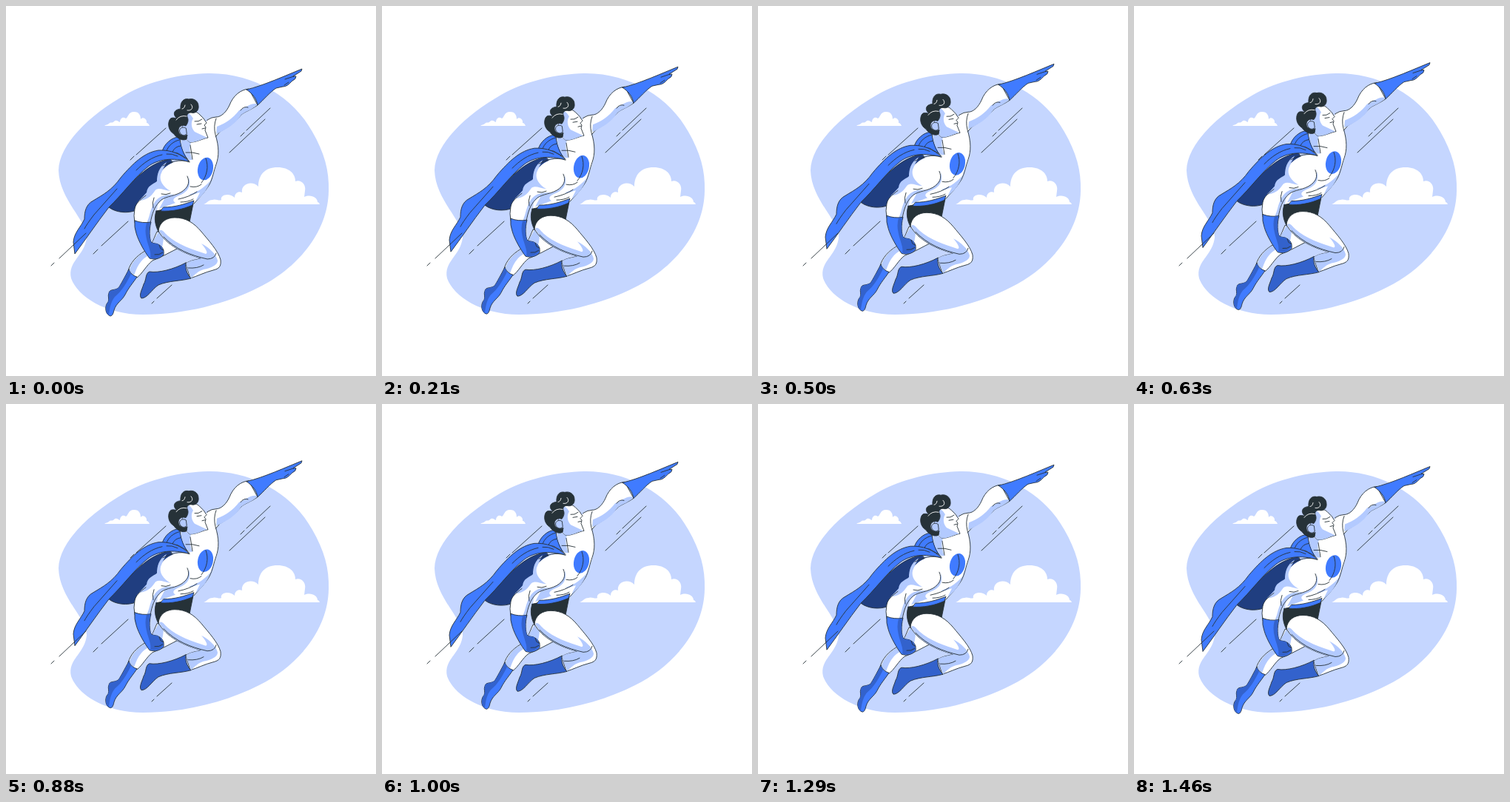
Animation, 500 px wide and 500 px high, one loop 1500 ms. Source, as an HTML page:

```html
<!DOCTYPE html>
<html lang="en">
<head>
<meta charset="utf-8">
<title>Flying hero</title>
<style>
  html, body { margin: 0; width: 100%; height: 100%; overflow: hidden; background: #fff; }
  svg { display: block; width: 100%; height: 100%; }
  path { stroke-linecap: round; stroke-linejoin: round; }
  .ink { stroke: #263238; stroke-width: .9; }
  .line { fill: none; stroke: #263238; stroke-width: .9; }
  .pale { fill: #c5d6ff; }
  .skin { fill: #fff; }
  .shade { fill: #b3caff; }
  .blue { fill: #407bff; }
  .deep { fill: #3362cc; }
  .navy { fill: #203e80; }
  .dark { fill: #263238; }
  .shine { fill: none; stroke: #fff; stroke-width: .9; }
</style>
</head>
<body>
<svg viewBox="0 0 500 500">
  <path class="pale" d="M273 91C335 90 389 124 414 170C430 198 437 222 436 250C435 308 391 356 342 380C297 403 240 417 185 417C135 417 97 393 88 368C83 345 106 338 109 313C110 290 72 262 71 222C72 187 112 148 161 120C195 101 235 92 273 91Z"/>

  <g class="skin">
    <path d="M133 162C135 160 137 161 139 159C141 156 144 159 146 156C149 153 152 156 154 157C154 152 158 149 162 152C165 151 165 143 173 143C180 143 182 148 182 153C185 149 191 153 190 158C192 158 193 160 194 162Z"/>
    <path d="M267 268C271 267 273 262 279 262C283 260 288 264 291 262C289 255 302 252 309 259C309 252 315 250 319 252C317 240 333 235 341 244C341 228 350 218 367 218C383 218 391 227 391 237C399 234 406 242 404 250L403 258C412 254 421 259 421 265Q423 265 424 268Z"/>
  </g>

  <path class="line" d="M168 208l5-5M176 201L216 165M302 198L350 153M317 176l5-5M325 168L357 138M118 335l6-6M129 324L165 291M197 402l3-3M204 395L224 377"/>

  <g id="hero">
    <!-- cape -->
    <path class="blue ink" d="M211 197C213 187 224 177 234 177L239 192L248 208L232 199Z"/>
    <path class="line" d="M217 196C219 189 226 183 234 181M225 197Q228 190 236 189"/>
    <path class="navy ink" d="M222 207C193 211 171 236 139 272C148 279 164 281 176 276L204 248L226 214Z"/>
    <path class="blue ink" d="M248 211C238 200 222 194 206 195C187 198 172 212 155 232C143 249 131 255 118 263C108 268 106 278 106 288C101 299 92 306 91 319L93 335C108 315 122 294 139 272C157 255 175 230 192 217C205 207 225 204 248 211Z"/>
    <path class="line" d="M150 247L119 282Q109 295 106 301M211 201C197 204 186 212 176 222M217 200Q224 199 232 203"/>

    <!-- raised arm -->
    <path class="skin ink" d="M272 154Q278 150 284 150C291 150 298 143 302 134C307 121 317 113 328 112L340 134C330 141 322 143 318 147C309 158 299 164 289 170L283 177Z"/>
    <path class="shade" d="M339 132C329 131 323 138 315 141C306 152 298 158 285 163L284 173C297 167 310 160 318 147C324 142 333 140 339 134Z"/>
    <path class="line" d="M317 141Q321 135 327 137"/>
    <path class="blue ink" d="M325 113C347 108 380 93 400 85L399 88L388 95L392 95Q392 99 387 101C382 106 379 109 374 109L365 111C357 116 348 127 340 134C339 126 333 118 325 113Z"/>
    <path class="line" d="M377 99L389 95M376 107L382 103"/>

    <!-- back leg -->
    <path class="skin ink" d="M204 305C198 318 196 327 188 331C176 338 168 347 165 358Q170 365 177 367C184 362 190 350 198 344C211 339 221 333 235 326Z"/>
    <path class="shade" d="M206 305L213 313C212 323 211 331 205 334C196 334 187 339 182 346C177 352 175 359 173 364L166 358C170 346 178 337 188 332C196 327 198 318 206 305Z"/>
    <path class="blue ink" d="M166 356C160 367 156 375 152 381C146 385 140 382 139 388C137 392 140 396 138 400C133 405 134 415 139 418C143 421 145 416 146 411C149 401 157 398 161 390C166 380 172 374 177 366C172 365 167 360 166 356Z"/>
    <path class="deep" d="M166 357C160 368 156 376 152 381C146 385 140 383 139 388C138 392 140 396 138 400C134 406 134 415 139 418C140 408 142 399 147 393C157 385 163 374 169 362Z"/>

    <!-- torso -->
    <path class="skin" d="M235 177C236 190 242 202 248 210L210 225L204 277L255 266C266 256 274 243 278 231C282 222 287 210 287 200Q287 186 283 176L284 152L272 155Z"/>
    <path class="line" d="M235 179C236 190 240 203 248 210M284 152Q280 162 283 174C288 190 288 203 284 214C281 222 279 234 275 241C268 253 260 260 254 267"/>
    <path class="shade" d="M236 178L250 184C247 193 249 200 252 208L247 208C240 199 236 189 236 178ZM246 229C249 239 243 248 234 253L215 259L207 274L229 266C224 263 226 259 234 256C245 252 252 243 246 229ZM276 236C266 248 256 252 247 255C253 256 257 253 262 252L256 264C266 256 273 247 276 236Z"/>
    <path class="line" d="M243 198Q252 197 261 200M249 188L252 207M233 261Q248 258 258 251M236 265Q246 265 253 261M249 244Q258 246 264 241"/>
    <ellipse class="blue" cx="269.500" cy="220" rx="10.300" ry="15.500" transform="rotate(12 269.500 220)"/>
    <path class="line" d="M270 206C274 217 272 229 264 239"/>

    <!-- trunks -->
    <path class="dark ink" d="M203 277L253 267L248 292C234 286 222 286 214 291Q208 297 206 305C201 295 200 286 203 277Z"/>
    <path class="blue ink" d="M213 272C228 272 241 268 254 263L252 269C239 275 223 278 209 277Z"/>

    <!-- front leg -->
    <path class="skin ink" d="M206 304C207 292 217 286 228 286C243 286 254 293 264 305C273 316 287 331 290 343C291 352 288 355 280 357C268 360 259 365 249 368L243 348C250 343 258 343 264 341C241 335 216 323 206 304Z"/>
    <path class="shade" d="M207 304C210 300 214 306 218 310C232 323 253 329 270 335C274 334 269 327 264 321C275 327 284 335 286 344C286 350 277 354 267 356C260 358 255 363 250 368L243 348C250 343 258 343 264 341C241 335 217 323 207 304Z"/>
    <path class="line" d="M213 312C229 329 250 337 272 342Q282 342 284 334M246 354Q259 355 267 350"/>
    <path class="deep ink" d="M243 347C226 356 206 361 194 359C188 361 190 370 186 376C184 383 179 391 183 395C191 395 197 383 206 377C220 371 236 372 250 368C244 362 242 354 243 347Z"/>

    <!-- near arm -->
    <path class="skin" d="M248 211C234 206 219 213 212 221C205 230 204 239 200 246C189 255 177 262 174 274Q172 283 174 293L195 295C197 281 201 271 207 265C213 257 225 258 236 252C246 246 249 236 246 229Z"/>
    <path class="shade" d="M217 211C206 218 204 228 204 237C198 241 191 243 190 252L180 263C188 263 196 258 201 250C205 244 213 249 222 250C212 244 207 236 209 228Q212 220 217 211ZM228 255C213 254 205 258 199 268C194 278 194 286 190 293L195 294C197 281 201 271 207 265Q214 258 228 255Z"/>
    <path class="line" d="M248 211C234 206 222 211 212 216M189 256C181 262 175 267 174 274Q172 283 174 293M195 294C197 281 201 271 207 265C213 257 225 258 236 252C246 246 249 239 245 230M200 259Q197 266 199 273M210 254Q216 256 222 253"/>
    <path class="blue ink" d="M174 290Q184 294 196 292C193 303 194 314 196 319C200 322 204 320 207 323C211 325 214 329 213 336C208 342 200 343 194 341C188 333 179 318 176 307Q173 299 174 290Z"/>
    <path class="deep" d="M190 293L195 293C193 303 194 314 196 319C200 322 204 320 207 323C211 325 213 329 212 335C207 341 200 342 195 340C197 334 192 324 190 315Q187 303 190 293Z"/>
    <path class="line" d="M207 323L209 328L213 330M201 336Q207 337 212 333"/>

    <!-- head -->
    <path class="skin ink" d="M241 148C250 141 257 142 261 146L267 152L271 158L268 161L270 164L269 168L273 178C266 179 256 185 248 184L237 174Z"/>
    <path class="shade" d="M241 146C247 143 250 147 253 152C249 158 251 166 255 170L272 178C266 179 256 185 248 184L237 174Z"/>
    <path class="line" d="M258 160L264 159M265 166L269 165"/>
    <path class="line" stroke-width="1.600" d="M255 156Q260 157 265 153"/>
    <path class="dark ink" d="M231 152C225 147 226 140 236 139C235 130 240 124 247 126C254 124 260 129 260 135C261 141 256 146 250 144C246 144 244 147 245 150C247 154 246 158 243 162C238 160 233 163 233 168C233 174 240 177 245 174L244 180C238 183 230 178 227 173C220 169 218 160 221 154C223 150 227 151 231 152Z"/>
    <path class="shine" d="M230 154Q235 147 244 149M238 139Q241 139 242 134M245 141C251 142 254 137 250 133"/>
    <path class="shade ink" d="M243 165C238 162 233 166 235 171C237 175 241 176 244 173Z"/>
  </g>

  <path class="line" d="M61 351l4-4M72 341L108 307"/>
</svg>
<script>
  const PERIOD = 1500, RISE = 10;
  const hero = document.getElementById("hero");

  function draw(now) {
    const phase = (now % PERIOD) / PERIOD;
    const lift = RISE * (1 - Math.abs(2 * phase - 1));
    hero.setAttribute("transform", `translate(0 ${-lift})`);
    requestAnimationFrame(draw);
  }
  draw(0);
</script>
</body>
</html>
```
